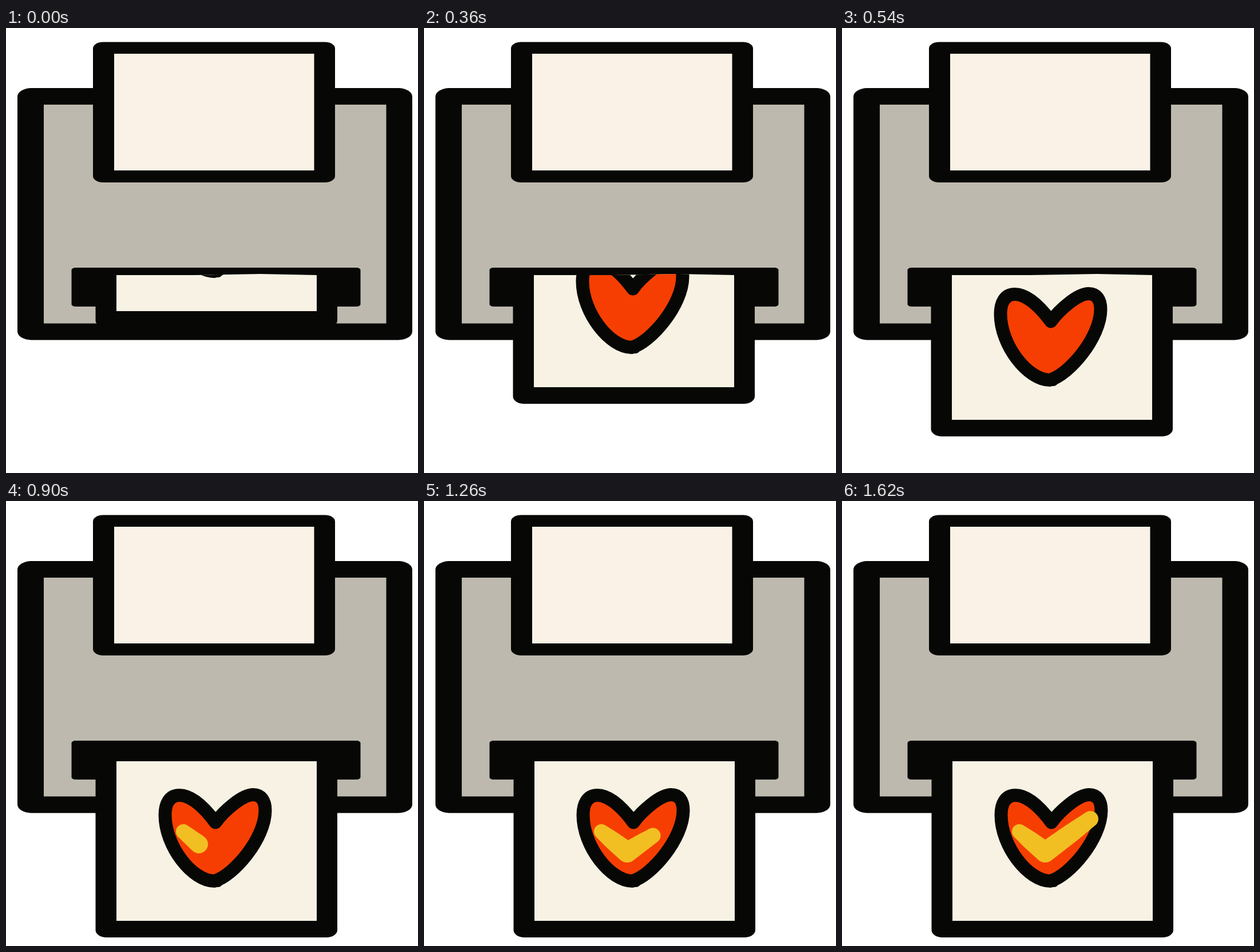
An HTML page with a canvas for the animation above (1980 ms loop, 720x778 px).

```html
<!DOCTYPE html>
<html lang="en">
<head>
<meta charset="utf-8">
<title>Heart printer</title>
<style>
  html, body { margin: 0; width: 100%; height: 100%; overflow: hidden; background: #fff; }
  canvas { display: block; }
</style>
</head>
<body>
<canvas id="stage" width="720" height="778"></canvas>
<script>
const ctx = document.getElementById('stage').getContext('2d');
const INK = '#070805', GREY = '#beb9ae', CREAM = '#faf2e6', SHEET = '#f8f2e4';
const RED = '#f63e02', YELLOW = '#f1bf22';

const STEP = 180, LOOP = 1980, LAST_STEP = 9;
const sheetShifts = [[0, -239], [-1, -173], [-1, -106], [-1, -49], [0, 0]];

const heart = new Path2D(`M366 562 C352 543 327 514.5 303 514.5
  C285 514.5 278 530 278 549 C278 604 326 664.5 364 664.5
  C398 655 453 590 453 541 C453 524 446 513.5 432 513.5
  C412 513.5 380 543 366 562 Z`);

// Opening of the slot, with its slightly uneven upper lip
const opening = new Path2D('M150 434 L192 432 L330 432 L445 430 L543 432 L590 432 V778 H150 Z');

// Brush positions: x, y, radius
const start = [310, 578, 13], bend = [330, 594, 16], turn = [355, 614, 18];
const strokes = {
  5: [start, [337, 600, 16]],
  6: [start, bend, [354, 615, 17.5]],
  7: [start, bend, turn, [400, 585, 13.5]],
  8: [start, bend, turn, [385, 591, 16], [419.5, 567, 13.5]],
  9: [start, bend, turn, [400, 581, 16.5], [434, 556, 14]]
};

function box(left, top, right, bottom, color, rx = 0, ry = rx) {
  ctx.fillStyle = color;
  ctx.beginPath();
  ctx.roundRect(left, top, right - left, bottom - top, { x: rx, y: ry });
  ctx.fill();
}

function drawPrinter() {
  box(20, 105, 710, 545.5, INK, 24, 15);
  box(66, 134, 664.5, 516.5, GREY);
  box(152, 24.5, 575, 270, INK, 18, 11);
  box(189, 45, 538.5, 249, CREAM);
  box(114.5, 419, 619.5, 487, INK, 7, 4);
}

function drawSheet() {
  box(156.5, 425, 579, 763, INK, 19, 13);
  box(193, 455, 543, 734, SHEET);
  ctx.fillStyle = RED;
  ctx.fill(heart);
  ctx.strokeStyle = INK;
  ctx.lineWidth = 23;
  ctx.lineJoin = 'round';
  ctx.stroke(heart);
  box(363, 660, 378, 675, INK, 7);
}

function drawBrush(points) {
  const samples = 50;
  ctx.fillStyle = YELLOW;
  ctx.beginPath();
  for (let i = 1; i < points.length; i++) {
    for (let k = 0; k <= samples; k++) {
      const [x, y, r] = points[i].map((v, n) => points[i - 1][n] + (v - points[i - 1][n]) * k / samples);
      ctx.moveTo(x + r, y);
      ctx.arc(x, y, r, 0, Math.PI * 2);
    }
  }
  ctx.fill();
}

function render(now) {
  const step = Math.min(LAST_STEP, Math.floor(now % LOOP / STEP));
  ctx.fillStyle = '#fff';
  ctx.fillRect(0, 0, 720, 778);
  drawPrinter();
  ctx.save();
  ctx.clip(opening);
  ctx.translate(...sheetShifts[Math.min(step, sheetShifts.length - 1)]);
  drawSheet();
  if (strokes[step]) drawBrush(strokes[step]);
  ctx.restore();
}

const origin = performance.now();
function tick() {
  render(performance.now() - origin);
  requestAnimationFrame(tick);
}
tick();
</script>
</body>
</html>
```
